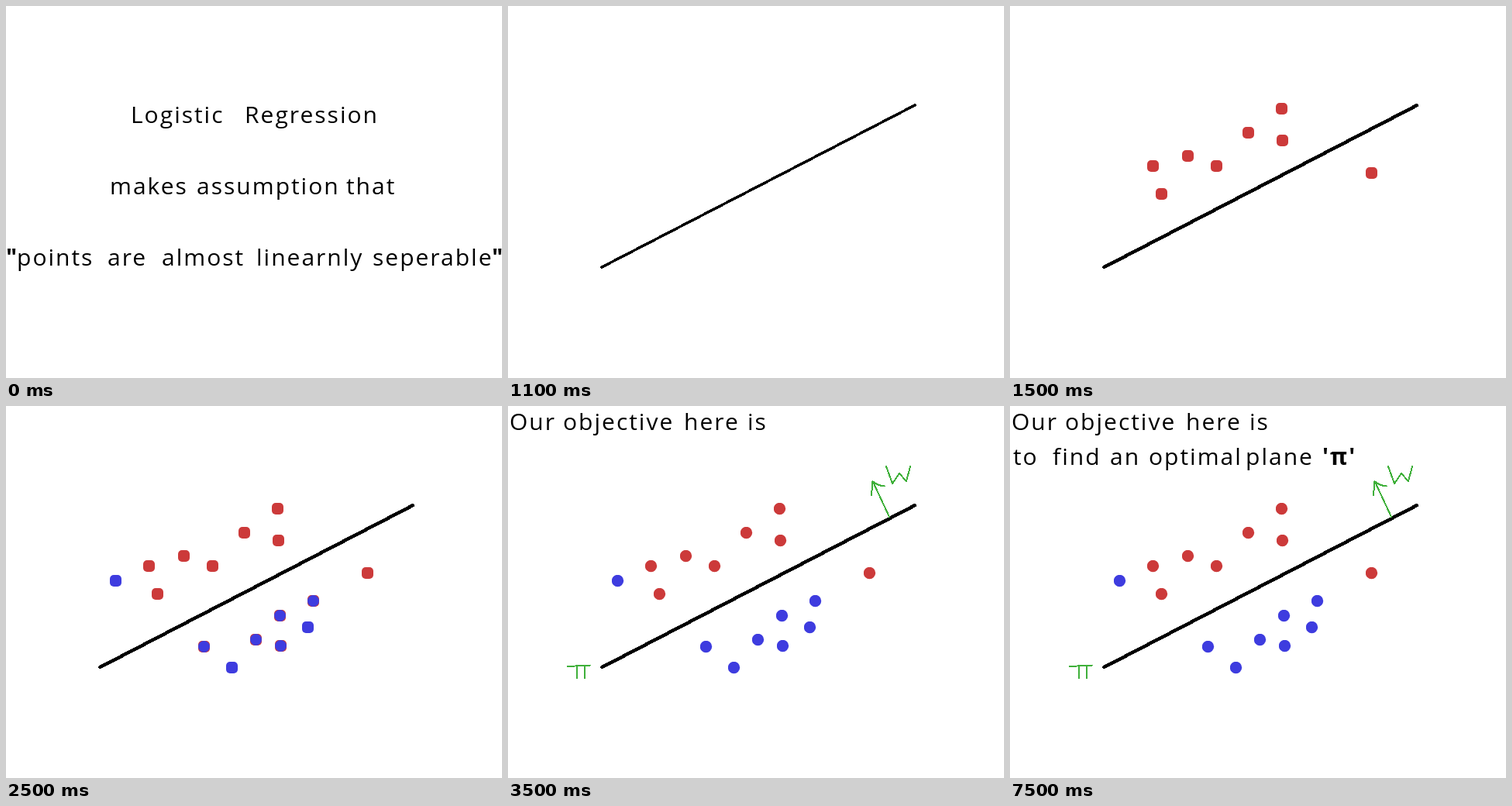
Animation, 640 px wide and 480 px high, one loop 8 s. Source, as an HTML page:

```html
<!DOCTYPE html>
<html lang="en">
<head>
<meta charset="utf-8">
<title>Logistic Regression</title>
<style>
  html, body { margin: 0; width: 100%; height: 100%; overflow: hidden; background: #fff; }
  svg { display: block; width: 100%; height: 100%; }

  text { font: 400 30px "Open Sans", "Noto Sans", sans-serif; letter-spacing: 2px; fill: #000; }
  .bold { font-weight: 700; letter-spacing: 2px; }

  .art { shape-rendering: crispEdges; }
  .plane { stroke: #000; stroke-linecap: round; }
  .green { fill: none; stroke: #3fb03a; stroke-width: 2; stroke-linecap: round; stroke-linejoin: round; }
  .red-block { marker: url(#redBlock); }
  .blue-block { marker: url(#blueBlock); }
  .fringed { marker: url(#fringedBlock); }
  .red-dot { marker: url(#redDot); }
  .blue-dot { marker: url(#blueDot); }

  /* Each scene part is switched on and off at hard cuts. */
  .scene { visibility: hidden; animation: 8s step-end infinite; }
  .title { animation-name: title; }
  .thin { animation-name: thin; }
  .thick { animation-name: thick; }
  .reds { animation-name: reds; }
  .blues { animation-name: blues; }
  .goal { animation-name: goal; }
  .answer { animation-name: answer; }
  @keyframes title { 0% { visibility: visible } 6.25%, 100% { visibility: hidden } }
  @keyframes thin { 0% { visibility: hidden } 6.25% { visibility: visible } 18.75%, 100% { visibility: hidden } }
  @keyframes thick { 0% { visibility: hidden } 18.75%, 100% { visibility: visible } }
  @keyframes reds { 0% { visibility: hidden } 18.75% { visibility: visible } 43.75%, 100% { visibility: hidden } }
  @keyframes blues { 0% { visibility: hidden } 31.25% { visibility: visible } 43.75%, 100% { visibility: hidden } }
  @keyframes goal { 0% { visibility: hidden } 43.75%, 100% { visibility: visible } }
  @keyframes answer { 0% { visibility: hidden } 93.75%, 100% { visibility: visible } }
</style>
</head>
<body>
<svg viewBox="0 0 640 480">
  <defs>
    <marker id="redBlock" markerUnits="userSpaceOnUse" markerWidth="16" markerHeight="16" refX="8" refY="8">
      <rect x=".5" y=".5" width="15" height="15" rx="5" fill="#cc3a3a"/>
    </marker>
    <marker id="blueBlock" markerUnits="userSpaceOnUse" markerWidth="16" markerHeight="16" refX="8" refY="8">
      <rect x=".5" y=".5" width="15" height="15" rx="5" fill="#3e3cdf"/>
    </marker>
    <marker id="fringedBlock" markerUnits="userSpaceOnUse" markerWidth="16" markerHeight="16" refX="8" refY="8">
      <rect x=".5" y=".5" width="15" height="15" rx="5" fill="#cc3a3a"/>
      <circle cx="8" cy="8" r="7.5" fill="#3e3cdf"/>
    </marker>
    <marker id="redDot" markerUnits="userSpaceOnUse" markerWidth="16" markerHeight="16" refX="8" refY="8">
      <circle cx="8" cy="8" r="7.7" fill="#cc3a3a"/>
    </marker>
    <marker id="blueDot" markerUnits="userSpaceOnUse" markerWidth="16" markerHeight="16" refX="8" refY="8">
      <circle cx="8" cy="8" r="7.7" fill="#3e3cdf"/>
    </marker>
    <polyline id="redPoints" fill="none" points="350.5,132.5 307.5,163.5 351.5,173.5 229.5,193.5 266.5,206.5 184.5,206.5 195.5,242.5 466.5,215.5"/>
    <polyline id="bluePlain" fill="none" points="141.5,225.5 291.5,337.5 389.5,285.5"/>
    <polyline id="blueRest" fill="none" points="255.5,310.5 322.5,301.5 354.5,309.5 353.5,270.5 396.5,251.5"/>
  </defs>

  <g class="scene title">
    <text y="151"><tspan x="161">Logistic</tspan> <tspan x="308">Regression</tspan></text>
    <text y="243"><tspan x="134">makes</tspan> <tspan x="246">assumption</tspan> <tspan x="439">that</tspan></text>
    <text y="335"><tspan x="0" class="bold">"</tspan><tspan x="14">points</tspan> <tspan x="131">are</tspan> <tspan x="201">almost</tspan> <tspan x="323">linearnly</tspan> <tspan x="473">seperable</tspan><tspan x="627" class="bold">"</tspan></text>
  </g>

  <g class="art">
    <path class="scene thin plane" d="M121 337L525 128" stroke-width="3.5"/>
    <path class="scene thick plane" d="M121.5 337L525 128.2" stroke-width="4.5"/>
    <use class="scene reds red-block" href="#redPoints"/>
    <g class="scene blues">
      <use class="blue-block" href="#bluePlain"/>
      <use class="fringed" href="#blueRest"/>
    </g>
    <g class="scene goal">
      <use class="red-dot" href="#redPoints"/>
      <use class="blue-dot" href="#bluePlain"/>
      <use class="blue-dot" href="#blueRest"/>
      <path class="green" d="M492 143L471 98M469 115L470.5 97Q477 103 486 103.500M488 78L496 100L505 87L514 97L519 78"/>
      <path class="green" d="M77 336L106 334.500M89 336V351M98.500 335.500L99 351"/>
    </g>
  </g>

  <text class="scene goal" y="31"><tspan x="2">Our</tspan> <tspan x="71">objective</tspan> <tspan x="227">here</tspan> <tspan x="309">is</tspan></text>
  <text class="scene answer" y="76"><tspan x="4">to</tspan> <tspan x="55">find</tspan> <tspan x="129">an</tspan> <tspan x="179">optimal</tspan> <tspan x="304">plane</tspan> <tspan x="403" class="bold">'π'</tspan></text>
</svg>
</body>
</html>
```
